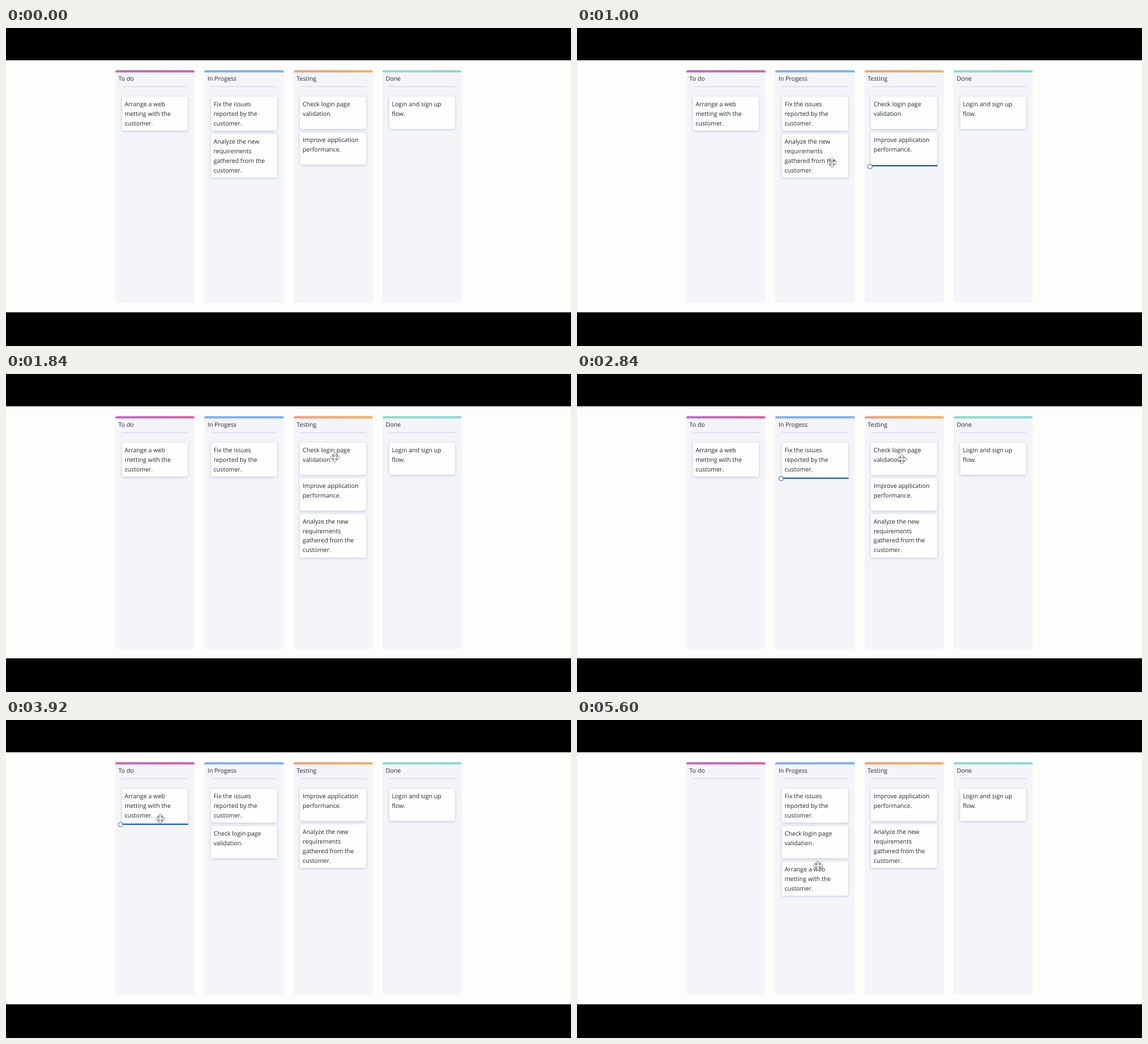
Write an HTML page that moves like this. It is 998 by 561 pixels and loops after 5640 ms.

```html
<!DOCTYPE html>
<html lang="en">
<head>
<meta charset="utf-8">
<title>Task board</title>
<style>
  html, body { margin: 0; width: 100%; height: 100%; overflow: hidden; background: #000; }
  #stage {
    position: relative; width: 998px; height: 561px; overflow: hidden;
    font: 10.65px/16.92px "Open Sans", "Noto Sans", sans-serif;
    text-rendering: geometricPrecision; color: #20262d; white-space: nowrap;
  }
  #stage * { box-sizing: border-box; }
  #page {
    position: absolute; top: 57px; width: 998px; height: 445px;
    background: #fdfdfc; border-bottom: 1px solid #888;
  }
  .column {
    position: absolute; top: 74px; width: 140.4px; height: 411px;
    border-radius: 4px; background: #f4f5f9; overflow: hidden;
  }
  .bar { height: 4px; transform: translateY(.4px); }
  .title { position: absolute; left: 5.6px; top: 7.8px; }
  .rule { position: absolute; left: 12px; top: 28.7px; width: 116.6px; height: 1px; background: #cdd0df; }
  .cards { position: absolute; left: 11.7px; top: 47.2px; width: 116.6px; }
  .card {
    min-height: 56.9px; margin-bottom: 5.9px; padding: 5.9px 4.7px 3.5px; border-radius: 3px;
    background: #fefefe; box-shadow: 0 1px 4px rgba(70, 105, 140, .34);
  }
  #marker { position: absolute; width: 117.5px; height: 1.7px; }
  #marker::before {
    content: ""; position: absolute; left: -6.5px; top: -2.6px; width: 7px; height: 7px;
    border: 1.4px solid #2459ae; border-radius: 50%; background: #fdfdfc;
  }
  #cursor { position: absolute; left: 0; top: 0; overflow: visible; }
</style>
</head>
<body>
<div id="stage">
  <div id="page"></div>
  <div id="marker"></div>
  <svg id="cursor" width="1" height="1">
    <defs>
      <path id="arrow" d="M-1.5 -1.5V-4.3H-4L0 -8.4L4 -4.3H1.5V-1.5"
        fill="#fff" stroke="#555a64" stroke-width=".9" stroke-linejoin="round"/>
    </defs>
    <use href="#arrow"/>
    <use href="#arrow" transform="rotate(90)"/>
    <use href="#arrow" transform="rotate(180)"/>
    <use href="#arrow" transform="rotate(270)"/>
  </svg>
</div>
<script>
const LOOP = 5640, STEP = 40;
const stage = document.getElementById("stage");
const marker = document.getElementById("marker");
const cursor = document.getElementById("cursor");

const tasks = {
  web: "Arrange a web<br>metting with the<br>customer.",
  fix: "Fix the issues<br>reported by the<br>customer.",
  analyze: "Analyze the new<br>requirements<br>gathered from the<br>customer.",
  check: "Check login page<br>validation.",
  improve: "Improve application<br>performance.",
  login: "Login and sign up<br>flow."
};

const columns = [
  ["To do", "#bf6bc0, #d0629c"],
  ["In Progess", "#8aaae8, #80b0ec"],
  ["Testing", "#f09d7b, #edb15c"],
  ["Done", "#90dac8, #8bd9d0"]
];
const columnX = i => 193 + 157.35 * i;

// Cards in each column, from the given time on.
const boards = [
  [0, "web", "fix analyze", "check improve", "login"],
  [1400, "web", "fix", "check improve analyze", "login"],
  [3200, "web", "fix check", "improve analyze", "login"],
  [4560, "", "fix check web", "improve analyze", "login"]
];

// Drop marker: start, end, column, y, colour.
const drops = [
  [800, 1400, 2, 243, "#285468"],
  [2400, 3200, 1, 183.8, "#2459ae"],
  [3760, 4120, 0, 183.8, "#2459ae"],
  [4120, 4560, 1, 246.6, "#2459ae"]
];

// Pointer stops: time, x, y. It stays put while a card is dragged.
const stops = [
  [360, 462, 198], [600, 450.5, 237.5], [1400, 450.5, 237.5],
  [1440, 578, 250], [1800, 581, 147], [1960, 581, 147],
  [2160, 574, 150.5], [3200, 574, 150.5],
  [3240, 425, 210], [3640, 272.5, 174], [4560, 272.5, 174],
  [4600, 425.5, 257], [LOOP, 425.5, 257]
];

const lists = columns.map(([title, colors], i) => {
  const column = document.createElement("div");
  column.className = "column";
  column.style.left = columnX(i) + "px";
  column.innerHTML = `<div class="bar" style="background:linear-gradient(90deg, ${colors})"></div>
    <div class="title">${title}</div><div class="rule"></div><div class="cards"></div>`;
  stage.insertBefore(column, marker);
  return column.lastElementChild;
});

let shown;
function showBoard(board) {
  if (board === shown) return;
  shown = board;
  lists.forEach((list, i) => {
    const ids = board[i + 1].split(" ").filter(Boolean);
    list.innerHTML = ids.map(id => `<div class="card">${tasks[id]}</div>`).join("");
  });
}

function showMarker(drop) {
  marker.hidden = !drop;
  if (!drop) return;
  const [, , column, y, color] = drop;
  marker.style.left = columnX(column) + 11.7 + "px";
  marker.style.top = y - 0.9 + "px";
  marker.style.background = color;
}

function showCursor(t) {
  const next = stops.findIndex(stop => stop[0] > t);
  cursor.style.display = next > 0 ? "block" : "none";
  if (next < 1) return;
  const [t0, x0, y0] = stops[next - 1], [t1, x1, y1] = stops[next];
  const p = (t - t0) / (t1 - t0), ease = p * p * (3 - 2 * p);
  cursor.style.transform = `translate(${x0 + (x1 - x0) * ease}px, ${y0 + (y1 - y0) * ease}px)`;
}

function draw(now) {
  const t = Math.floor(now % LOOP / STEP) * STEP;
  showBoard(boards.filter(board => board[0] <= t).pop());
  showMarker(drops.find(([from, to]) => t >= from && t < to));
  showCursor(t);
}

const start = performance.now();
function tick() {
  draw(performance.now() - start);
  requestAnimationFrame(tick);
}
tick();
</script>
</body>
</html>
```
